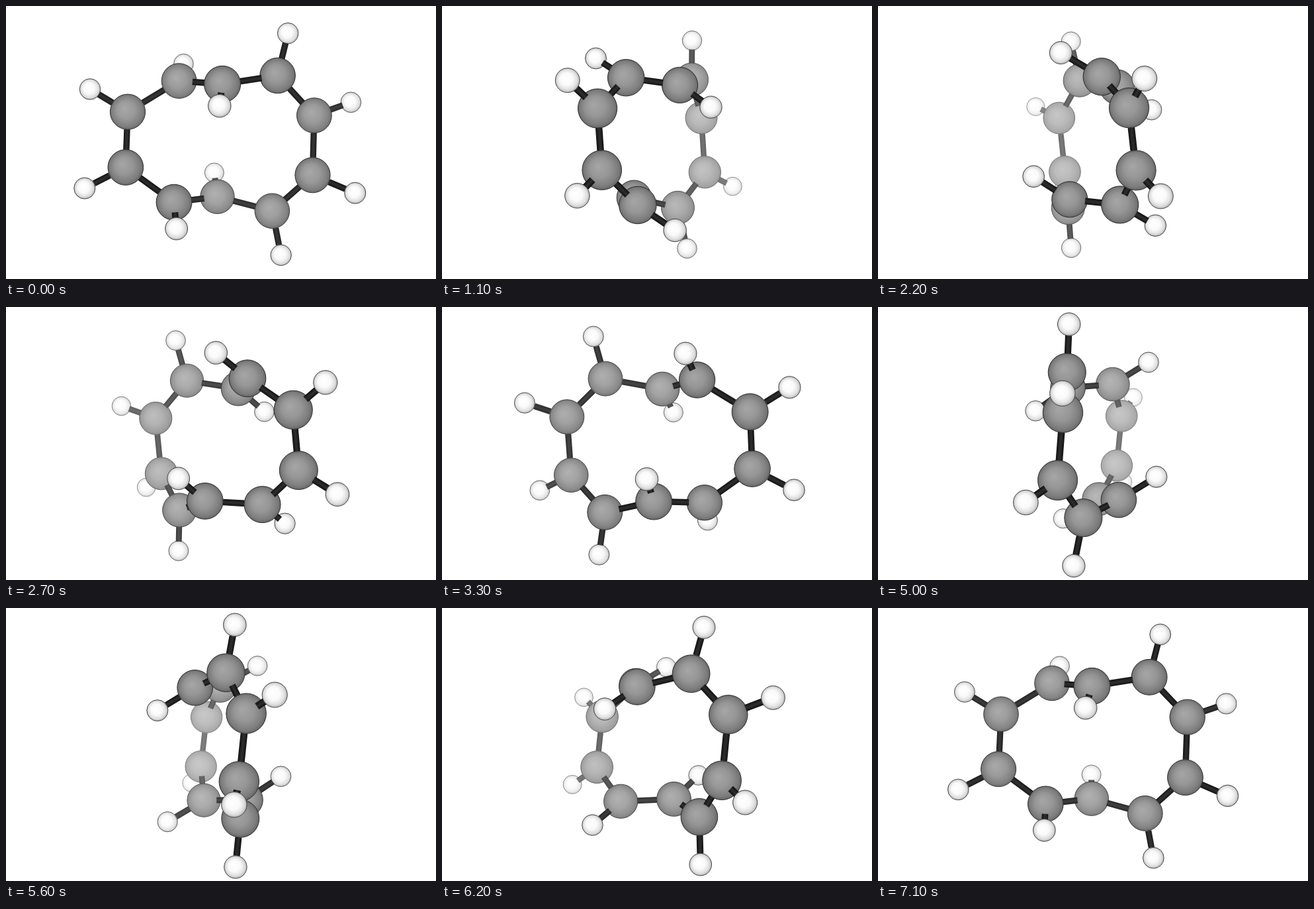
Recreate the animation shown at these times as an HTML page with a canvas. Size 650 px wide and 412 px high, loop 7.2 s.

```html
<!DOCTYPE html>
<html lang="en">
<head>
<meta charset="utf-8">
<title>Rotating ring molecule</title>
<style>
  html, body { margin: 0; width: 100%; height: 100%; overflow: hidden; background: #fff; }
  canvas { display: block; }
</style>
</head>
<body>
<canvas id="stage" width="650" height="412"></canvas>
<script>
const ctx = document.getElementById('stage').getContext('2d');
const CX = 325, CY = 206, EYE = 1150;
const STEPS = 72, STEP_MS = 100;
const BOND = 4.7;

// x, y, z; z points at the viewer
const carbons = [
  [-64, -93.8, -10], [2, -85, 40], [85, -100.3, 8], [142, -41.2, -9], [138.5, 49.2, 0],
  [78.3, 104.5, -14], [-5.7, 84.5, -39], [-70, 89, 15.5], [-143, 37.2, 9.3], [-141, -46.3, 0]
];
const hydrogens = [
  [-60, -126, -70], [-2, -50.7, 96], [101.3, -165, -1.5], [202, -62.4, -33], [199.5, 75, 18.5],
  [91, 170.6, -4.5], [-11, 49.3, -96], [-63, 121.6, 74.5], [-203, 68, 17.5], [-198.5, -80.7, -3]
];

const carbonLook = { r: 27, line: 45, shades: [[0, 166], [0.5, 150], [0.85, 124], [1, 100]] };
const hydrogenLook = { r: 16.2, line: 70, shades: [[0, 255], [0.5, 250], [0.8, 224], [1, 176]] };

const atoms = [
  ...carbons.map(p => ({ p, look: carbonLook })),
  ...hydrogens.map(p => ({ p, look: hydrogenLook }))
];
const bonds = carbons.flatMap((_, i) => [[i, (i + 1) % 10], [i, i + 10]]);

// Grey level faded towards white with distance
function grey(level, z) {
  const fog = Math.min(0.5, Math.max(0, (10 - z) * 0.0026));
  const v = Math.round(level + (255 - level) * fog);
  return `rgb(${v},${v},${v})`;
}

function turn([x, y, z], angle) {
  const c = Math.cos(angle), s = Math.sin(angle);
  return [x * c + z * s, y, z * c - x * s];
}

function project([x, y, z]) {
  const k = EYE / (EYE - z);
  return { x: CX + x * k, y: CY + y * k, k };
}

function drawAtom(pos, look) {
  const { x, y, k } = project(pos), r = look.r * k, z = pos[2];
  const fill = ctx.createRadialGradient(x - r * 0.2, y - r * 0.2, 0, x, y, r);
  for (const [at, level] of look.shades) fill.addColorStop(at, grey(level, z));
  ctx.beginPath();
  ctx.arc(x, y, r - 0.4, 0, Math.PI * 2);
  ctx.fillStyle = fill;
  ctx.fill();
  ctx.strokeStyle = grey(look.line, z);
  ctx.lineWidth = 1;
  ctx.stroke();
}

// The part of a bond between the two sphere surfaces
function bondEnds(a, b, ra, rb) {
  const d = b.map((v, i) => v - a[i]), len = Math.hypot(...d);
  const at = t => a.map((v, i) => v + d[i] * t / len);
  const inset = r => Math.sqrt(r * r - BOND * BOND);
  return [at(inset(ra)), at(len - inset(rb))];
}

function drawBond(from, to) {
  const a = project(from), b = project(to), z = (from[2] + to[2]) / 2;
  const len = Math.hypot(b.x - a.x, b.y - a.y) || 1;
  const nx = (a.y - b.y) / len * BOND, ny = (b.x - a.x) / len * BOND;
  const fill = ctx.createLinearGradient(a.x - nx, a.y - ny, a.x + nx, a.y + ny);
  fill.addColorStop(0, grey(20, z));
  fill.addColorStop(0.5, grey(46, z));
  fill.addColorStop(1, grey(20, z));
  ctx.beginPath();
  ctx.moveTo(a.x + nx * a.k, a.y + ny * a.k);
  ctx.lineTo(b.x + nx * b.k, b.y + ny * b.k);
  ctx.lineTo(b.x - nx * b.k, b.y - ny * b.k);
  ctx.lineTo(a.x - nx * a.k, a.y - ny * a.k);
  ctx.closePath();
  ctx.fillStyle = fill;
  ctx.fill();
}

function draw(angle) {
  const placed = atoms.map(({ p, look }) => ({ pos: turn(p, angle), look }));
  const parts = placed.map(({ pos, look }) => ({ z: pos[2], paint: () => drawAtom(pos, look) }));
  for (const [i, j] of bonds) {
    const a = placed[i], b = placed[j];
    const [from, to] = bondEnds(a.pos, b.pos, a.look.r, b.look.r);
    parts.push({ z: (from[2] + to[2]) / 2, paint: () => drawBond(from, to) });
  }
  ctx.fillStyle = '#fff';
  ctx.fillRect(0, 0, 650, 412);
  parts.sort((a, b) => a.z - b.z).forEach(part => part.paint());
}

const start = performance.now();
function tick() {
  const step = Math.floor((performance.now() - start) / STEP_MS) % STEPS;
  draw(step / STEPS * Math.PI * 2);
  requestAnimationFrame(tick);
}
tick();
</script>
</body>
</html>
```
